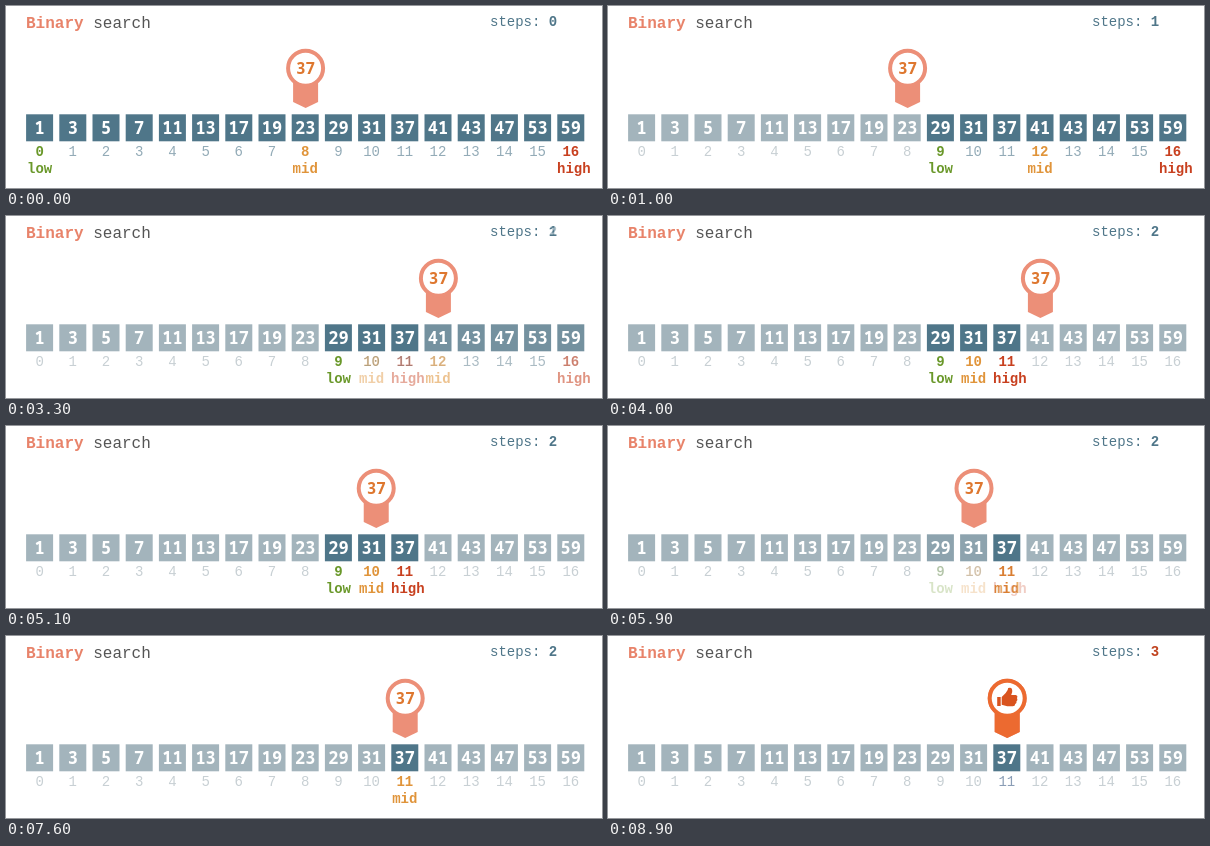
Recreate the animation shown at these times as an HTML page. Size 596 px wide and 182 px high, loop 9.1 s.

```html
<!DOCTYPE html>
<html lang="en">
<head>
<meta charset="utf-8">
<title>Binary search</title>
<style>
  html, body { margin: 0; width: 100%; height: 100%; overflow: hidden; background: #fff; }
  svg { display: block; width: 596px; height: 182px; }
  text { font: 14px "Liberation Mono", monospace; white-space: pre; }
  .mid-x { text-anchor: middle; }
  .bold { font-weight: 700; }
  .title { font-size: 16px; }
  .num { font: 600 17px "Noto Sans Mono", "DejaVu Sans Mono", monospace; }
  .key { font: 600 16px "Noto Sans Mono", "DejaVu Sans Mono", monospace; }
</style>
</head>
<body>
<svg id="stage" viewBox="0 0 596 182"></svg>
<script>
const LOOP = 9100;
const SLATE = '#4f7689', DIM = '#a3b4bc';
const LABEL = { low: '#6a982a', mid: '#e0943a', high: '#c8401f' };
const values = [1, 3, 5, 7, 11, 13, 17, 19, 23, 29, 31, 37, 41, 43, 47, 53, 59];
const cx = i => 33.6 + 33.2 * i;

// Each stage of the search fades in over the one before it.
const stages = [
  { from: 0, to: 8, range: [0, 16], marks: { low: 0, mid: 8, high: 16 }, steps: 0 },
  { start: 250, end: 720, range: [9, 16], marks: { low: 9, mid: 12, high: 16 }, steps: 1 },
  { start: 3150, end: 3720, range: [9, 11], marks: { low: 9, mid: 10, high: 11 }, steps: 2 },
  { start: 5650, end: 6220, range: [11, 11], marks: { mid: 11 }, steps: 2 },
  { start: 7850, end: 8420, range: [11, 11], marks: {}, steps: 3, done: true }
];
const moves = [
  { start: 2180, end: 2790, from: 8, to: 12 },
  { start: 4680, end: 5290, from: 12, to: 10 },
  { start: 6880, end: 7570, from: 10, to: 11 }
];

const text = (x, y, s, fill, cls = '') =>
  `<text x="${x}" y="${y}" fill="${fill}" class="${cls}">${s}</text>`;

function cell(i, st) {
  const x = cx(i), live = i >= st.range[0] && i <= st.range[1];
  const mark = Object.keys(st.marks).find(k => st.marks[k] === i);
  const color = mark ? LABEL[mark] : !live ? '#c8d0d4' : st.done ? '#8a9db5' : '#93abb7';
  return `<rect x="${x - 13.5}" y="108.3" width="27" height="27" fill="${live ? SLATE : DIM}"/>`
    + text(x, 127.5, values[i], '#fff', 'num mid-x')
    + text(x, 150, i, color, mark ? 'bold mid-x' : 'mid-x')
    + (mark ? text(x + (mark === 'high' ? 3 : 0), 167, mark, color, 'bold mid-x') : '');
}

const layer = st => `<g class="layer"><rect width="596" height="182" fill="#fff"/>`
  + text(20, 22, '<tspan class="bold" fill="#e8836a">Binary</tspan> search', '#555', 'title')
  + text(484, 20, `steps: <tspan class="bold" fill="${st.done ? '#c0431f' : SLATE}">${st.steps}</tspan>`, SLATE)
  + values.map((_, i) => cell(i, st)).join('') + '</g>';

const pinShape = color =>
  `<path d="M-12.5 76H12.5V96L0 102L-12.5 96Z" fill="${color}"/>
   <circle cy="62.3" r="17.5" fill="#fff" stroke="${color}" stroke-width="4"/>`;

const thumb = `<path transform="translate(0 62)" fill="#d9531e" d="M-10-1H-6.5V8H-10Z
  M-5.5-1L-1.5-5Q1-8 1-10Q5.5-11.5 5-6L4-3H8.5Q11-2.5 9.8 0Q11 2 9.2 3.5Q9.8 5.3 8 6
  Q8 8.3 5.5 8.3H0L-5.5 6.8Z"/>`;

document.getElementById('stage').innerHTML = stages.map(layer).join('')
  + `<g id="pin">${pinShape('#ec8f78')}${text(0, 68, 37, '#de772f', 'key mid-x')}
     <g id="found">${pinShape('#ec6a30')}${thumb}</g></g>`;

const layers = document.querySelectorAll('.layer');
const pin = document.getElementById('pin');
const found = document.getElementById('found');

// cubic-bezier(.25, .1, .25, 1)
function ease(u) {
  if (u <= 0) return 0;
  if (u >= 1) return 1;
  let a = 0, b = 1, s;
  const curve = (p, q) => 3 * s * (1 - s) ** 2 * p + 3 * s * s * (1 - s) * q + s ** 3;
  for (let k = 0; k < 20; k++) {
    s = (a + b) / 2;
    if (curve(.25, .25) < u) a = s; else b = s;
  }
  return curve(.1, 1);
}
const progress = (t, m) => ease((t - m.start) / (m.end - m.start));

const origin = performance.now();
function draw() {
  const t = (performance.now() - origin) % LOOP;
  stages.forEach((st, i) => {
    if (i) layers[i].setAttribute('opacity', progress(t, st));
  });
  found.setAttribute('opacity', progress(t, stages[4]));
  const at = moves.reduce((x, m) => x + (m.to - m.from) * progress(t, m), 8);
  pin.setAttribute('transform', `translate(${cx(at) + .4} 0)`);
  requestAnimationFrame(draw);
}
draw();
</script>
</body>
</html>
```
